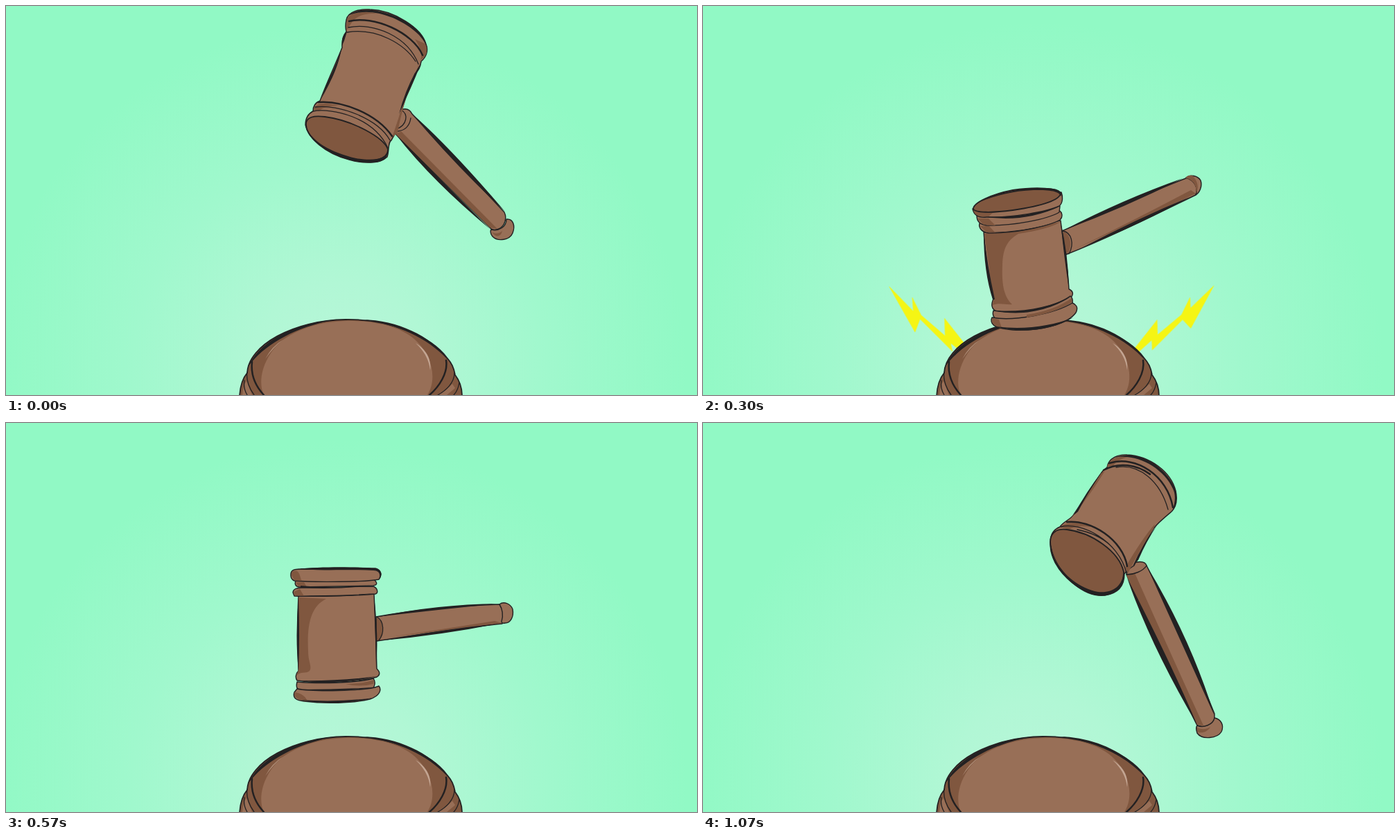
These frames come from a looping animation (997 by 562 pixels, 1.17 s). An HTML page without scripts:

```html
<!DOCTYPE html>
<html lang="en">
<head>
<meta charset="utf-8">
<title>Gavel</title>
<style>
html, body { margin: 0; width: 100%; height: 100%; overflow: hidden; background: #91f9c5; }
svg { display: block; width: 100%; height: 100%; }
:root { --ink: #232122; --wood: #986f57; --shade: #80573f; --bolt: #f5f514; }

.b { fill: var(--wood); stroke: var(--ink); stroke-width: 1.4; stroke-linejoin: round; }
.f { fill: var(--shade); stroke: var(--ink); stroke-width: 1.8; }
.s { fill: var(--shade); }
.w { fill: var(--wood); }
.k { fill: var(--ink); }
.l { fill: none; stroke: var(--ink); stroke-width: 1.3; stroke-linecap: round; }
.t { stroke-width: 2.5; }
.h { fill: #c3a592; }

/* each pose is held for its own window of the loop */
.pose { visibility: hidden; animation: hold 1170ms step-end calc(var(--t) * 1ms - 1170ms) infinite; }
.quick { animation-name: hold-quick; }
@keyframes hold { 0% { visibility: visible; } 8.547%, 100% { visibility: hidden; } }
@keyframes hold-quick { 0% { visibility: visible; } 7.6923%, 100% { visibility: hidden; } }

/* bolts fly outwards in eight steps after the blow */
.bolt {
  fill: var(--bolt); stroke: var(--bolt); stroke-width: .8; visibility: hidden;
  transform-box: fill-box; transform-origin: var(--o, 50% 50%);
  animation: fly 1170ms infinite;
}
@keyframes fly {
  0% { visibility: hidden; transform: var(--from); animation-timing-function: step-end; }
  25.641% { visibility: visible; transform: var(--from); animation-timing-function: steps(8, end); }
  46.1538% { visibility: hidden; transform: var(--to); animation-timing-function: step-end; }
  100% { visibility: hidden; transform: var(--to); }
}
#left { --from: translate(195px, 172px) rotate(0deg) scale(.79); --to: translate(-65px, -57px) rotate(0deg) scale(1.07); }
#right { --from: translate(-181px, 159px) rotate(-5.8deg) scale(.8); --to: translate(60px, -53px) rotate(1.9deg) scale(1.067); }
#top { --o: 90% 0; --from: translate(8px, 276px) rotate(-5deg) scale(.8); --to: translate(-3px, -92px) rotate(1.7deg) scale(1.067); }
</style>
</head>
<body>
<svg viewBox="0 0 997 562" preserveAspectRatio="none">
<defs>
  <radialGradient id="glow" gradientUnits="userSpaceOnUse" cx="482" cy="524" r="500">
    <stop offset="0" stop-color="#b8f6d9"/>
    <stop offset=".25" stop-color="#b1f7d5"/>
    <stop offset=".6" stop-color="#a0f8cd"/>
    <stop offset="1" stop-color="#91f9c5"/>
  </radialGradient>

  <g id="raised">
    <path class="b" d="M570 150C578 147 583 150 586 156L719 298C723 306 720 318 711 322C705 325 700 323 698 320L562 185Z"/>
    <path class="s" d="M562 185L698 320L709 322L570 181Z"/>
    <path class="k" d="M584 154Q640 203 720 297Q650 232 584 154ZM562 185Q612 250 698 322Q625 248 562 185Z"/>
    <path class="l" d="M570 150C581 156 579 172 563 178M584 162C582 175 574 180 565 181"/>
    <path class="b" d="M722 308C732 307 735 318 731 328C727 338 710 341 702 333C698 328 699 324 700 323C711 326 722 319 722 308Z"/>
    <path class="s" d="M701 326C705 330 712 329 716 325C714 334 706 335 701 326Z"/>
    <path class="b" d="M491 20C493 8 510 4 525 5C560 6 600 32 606 55C610 65 606 74 599 80C598 88 594 95 590 98C582 118 573 140 569 158C566 170 564 182 556 194C551 196 553 210 550 218C540 228 515 228 495 222C460 213 435 190 432 172C432 160 437 155 443 152C443 145 445 140 453 137C463 110 475 85 485 60C484 48 487 42 491 37C489 30 490 25 491 20Z"/>
    <path class="s" d="M596 82C592 108 574 135 567 160L557 190L565 183C571 150 580 122 591 98ZM492 20C495 8 520 7 535 11C515 10 505 16 500 22L491 36ZM444 150C446 140 460 139 480 144C465 144 455 147 452 152ZM606 55C609 66 606 73 598 78C601 70 598 60 590 48Z"/>
    <path class="f" d="M433 172C432 160 445 158 460 160C500 165 545 190 551 207C552 222 530 226 505 222C470 215 435 195 433 172Z"/>
    <path class="k" d="M432 170C432 195 485 231 535 226C548 224 551 217 551 207C549 222 530 224 505 220C470 212 437 195 432 170ZM494 14C510 1 535 4 565 16C592 29 606 45 608 62C602 42 582 28 558 17C533 7 512 6 494 14ZM485 58C479 90 468 110 455 134L463 112Q479 80 485 58ZM590 97Q576 122 567 156Q576 136 591 102L600 80ZM485 57C484 46 487 41 492 37L488 50Z"/>
    <path class="l" d="M443 152C470 147 530 160 551 205M446 146C480 141 537 163 554 194M494 31C530 23 580 44 595 84M492 38C535 31 575 55 591 80"/>
    <path class="l t" d="M450 139C485 136 535 156 557 188M495 22C530 13 587 38 601 71"/>
  </g>

  <g id="falling">
    <path class="b" d="M519 256C570 240 640 222 702 214C712 218 718 231 714 241C650 258 590 275 523 291Z"/>
    <path class="s" d="M519 257C531 260 535 275 530 288L522 290ZM540 286Q620 264 714 240L700 236Q610 262 540 286Z"/>
    <path class="k" d="M519 257Q610 222 702 214Q610 235 519 257ZM530 290Q600 279 690 246Q600 267 530 290Z"/>
    <path class="l" d="M519 256C530 261 536 272 533 280L524 291"/>
    <path class="b" d="M702 214C706 208 718 211 721 220C724 230 720 240 714 241C718 231 712 218 702 214Z"/>
    <path class="s" d="M704 213C714 218 718 230 714 240C709 236 712 222 704 213Z"/>
    <path class="b" d="M402 234C403 270 407 320 413 346C409 350 410 356 416 359C450 364 510 357 526 350C530 343 527 336 522 334C519 300 520 260 516 229Z"/>
    <path class="s" d="M402 237L413 346C418 350 425 350 424 345C415 320 411 280 413 250C418 243 430 243 445 242C480 242 505 240 516 234L516 229Z"/>
    <path class="k" d="M402 237Q400 290 413 346Q406 300 402 237ZM516 232Q525 280 523 334Q519 290 516 232Z"/>
    <path class="b" d="M412 361C410 368 413 371 420 372C460 374 510 366 525 361C527 356 526 353 524 352C500 360 450 363 412 361Z"/>
    <path class="b" d="M411 375C409 384 415 388 430 389C475 392 510 384 528 375C534 370 534 361 527 359C505 370 450 374 411 372Z"/>
    <path class="k" d="M416 386C455 393 500 389 530 374C505 384 460 389 416 386ZM414 357C450 366 500 362 526 350C500 357 450 361 414 357Z"/>
    <path class="s" d="M416 363C450 368 490 365 520 357C500 366 450 370 416 369Z"/>
    <path class="b" d="M399 227C396 231 398 236 404 237C450 240 500 235 519 227C522 222 521 217 517 217C490 228 440 230 399 227Z"/>
    <path class="b" d="M399 215C396 220 399 223 407 224C450 226 500 220 517 215C520 211 518 208 514 207C480 216 430 218 399 215Z"/>
    <path class="b" d="M390 208C389 203 394 201 402 200C430 190 480 187 505 190C520 192 523 195 522 202C520 208 510 208 490 209C450 214 400 217 393 213Z"/>
    <path class="s" d="M405 202C440 189 490 187 518 193C490 203 450 208 405 207ZM391 208C392 202 400 201 405 203L403 214ZM398 218L410 216L425 223L404 223ZM399 230L420 230L425 237L404 236Z"/>
    <path class="k" d="M395 202C430 188 490 186 515 192C480 189 430 194 395 202ZM392 212C440 219 480 207 517 207C480 211 440 220 392 212ZM402 235C450 240 490 236 518 228C490 233 450 237 402 235ZM410 224Q465 226 515 216Q465 231 410 224Z"/>
    <path class="l" d="M407 207C440 208 490 203 519 194"/>
  </g>

  <g id="struck">
    <path class="b" d="M513 368C570 325 630 280 684 239C694 243 700 250 701 265C640 315 590 355 533 396C525 402 520 399 518 390Z"/>
    <path class="s" d="M513 369C527 368 534 382 529 398C522 400 518 395 513 369ZM540 388L700 264L693 259Q610 328 540 388Z"/>
    <path class="k" d="M518 364Q610 286 684 239Q610 300 518 364ZM538 392Q620 339 690 274Q620 326 538 392Z"/>
    <path class="l" d="M514 368C528 367 538 382 533 396M516 375C526 375 532 385 529 395"/>
    <path class="b" d="M684 239C688 232 704 234 709 243C714 253 710 262 701 262C700 250 694 243 684 239Z"/>
    <path class="s" d="M684 238C687 233 692 234 694 236C699 242 703 254 701 260C698 248 692 242 684 238Z"/>
    <path class="b" d="M404 396C410 430 420 460 428 480C422 487 424 495 428 500L428 513C428 524 443 531 465 531C500 530 535 510 545 490C548 480 546 474 543 469C544 461 540 456 537 454C528 440 522 410 513 368Z"/>
    <path class="s" d="M405 398L428 480C423 488 425 498 432 499C440 495 450 497 457 496C450 488 447 475 446 460C440 430 442 412 455 402C480 397 500 385 513 370L510 360ZM428 502C470 508 520 495 541 472L545 476C530 500 470 515 428 511Z"/>
    <path class="k" d="M404 397Q409 440 427 480L429 480Q413 435 404 397ZM517 385Q522 425 538 457Q526 425 517 385ZM428 514C430 538 510 535 545 489C515 525 460 537 428 514ZM428 480C422 487 422 495 429 502C425 492 426 487 430 482Z"/>
    <path class="l t" d="M428 500C470 506 525 490 542 466"/>
    <path class="l" d="M428 512C470 519 530 500 545 475M429 506C470 510 525 497 543 472"/>
    <path class="b" d="M393 376C392 388 398 395 405 397C440 404 492 388 508 365C512 358 511 350 508 345Z"/>
    <path class="s" d="M394 378C393 388 398 394 406 396L420 386ZM420 388C460 388 495 372 509 352L509 362C490 380 450 394 420 392Z"/>
    <path class="l" d="M398 382C440 391 490 375 509 350M405 398C440 404 490 388 509 364"/>
    <path class="b" d="M385 362C387 375 393 379 401 379C440 383 500 365 509 342C510 333 508 328 505 325Z"/>
    <path class="f" d="M386 362C385 345 405 329 440 321C475 314 506 317 507 330C508 346 475 363 440 371C410 377 388 376 386 362Z"/>
    <path class="l t" d="M386 360C387 374 396 378 410 377C445 376 500 358 508 338C509 325 500 318 480 318C462 318 445 320 435 323"/>
  </g>

  <g id="rebound">
    <path class="b" d="M521 321C580 296 640 268 702 244C712 248 718 258 714 269C650 300 590 330 527 355Z"/>
    <path class="s" d="M521 322C532 322 537 340 530 353L524 350ZM540 347L714 267L707 262Q620 308 540 347Z"/>
    <path class="k" d="M523 320Q610 275 695 245Q610 288 523 320ZM550 345Q640 309 705 272Q630 303 550 345Z"/>
    <path class="l" d="M522 321C535 323 539 340 531 354"/>
    <path class="b" d="M700 244C706 239 717 241 721 248C724 257 719 266 714 269C718 258 712 248 700 244Z"/>
    <path class="s" d="M699 244C704 239 710 240 711 243C717 250 719 260 714 267C716 256 711 248 699 244Z"/>
    <path class="b" d="M408 323C411 360 415 395 422 419C418 428 420 434 426 437C470 443 515 430 534 417C538 412 537 408 531 405C529 370 523 340 519 306Z"/>
    <path class="s" d="M409 325L422 420L421 428C430 424 440 428 449 427C436 415 434 395 435 370C436 345 442 335 458 325C485 321 508 315 519 308Z"/>
    <path class="k" d="M408 324Q408 380 421 420L424 420Q413 370 408 324ZM519 308Q524 360 531 405Q530 355 519 308Z"/>
    <path class="b" d="M422 436C420 442 422 447 428 449C470 453 520 438 536 426C537 420 536 417 533 415C510 431 460 443 422 436Z"/>
    <path class="b" d="M419 449C418 458 428 462 450 464C490 466 530 455 541 439C545 431 541 427 536 425C510 441 450 452 420 446Z"/>
    <path class="s" d="M421 447C418 455 425 459 434 461L430 449ZM470 442Q510 436 535 418L535 424Q510 440 470 446Z"/>
    <path class="k" d="M426 459C460 469 505 466 537 446C505 459 465 464 426 459ZM424 436C465 446 510 433 535 415C505 431 465 439 424 436Z"/>
    <path class="b" d="M402 310C400 318 407 323 415 324C450 325 500 315 518 305C523 300 521 294 517 291Z"/>
    <path class="b" d="M398 299C398 308 404 312 412 313C450 314 500 304 517 294L518 285Z"/>
    <path class="b" d="M392 289C394 299 402 302 412 301C450 302 500 293 517 285C523 280 522 270 520 265Z"/>
    <path class="s" d="M393 290C394 299 403 301 414 301L422 294ZM399 303L415 303L425 313L408 312ZM403 314L416 314L425 324L412 323Z"/>
    <path class="f" d="M393 289C393 280 420 268 450 262C485 257 516 259 519 267C517 277 490 285 450 291C420 295 395 295 393 289Z"/>
    <path class="k" d="M405 278C430 264 470 258 500 259C517 260 521 264 520 271C515 262 500 262 480 262C450 263 425 270 405 278ZM405 300Q465 303 517 286Q465 310 405 300ZM410 323Q465 326 518 306Q470 323 410 323Z"/>
  </g>

  <g id="level">
    <path class="b" d="M534 280C590 270 650 264 712 262C717 269 719 279 716 290C660 296 600 305 535 315Z"/>
    <path class="s" d="M535 281C545 285 545 305 538 314L534 314ZM555 309L716 289L705 286Q630 298 555 309Z"/>
    <path class="k" d="M536 280Q620 262 710 261Q620 270 536 280ZM545 314Q630 306 710 290Q630 298 545 314Z"/>
    <path class="l" d="M535 280C546 286 546 304 538 314"/>
    <path class="b" d="M712 262C718 257 728 261 731 269C733 280 728 289 720 289C716 290 715 288 715 287C718 278 716 268 712 262Z"/>
    <path class="b" d="M422 250C420 290 421 330 422 358C418 362 417 368 420 372C450 377 510 374 535 367C540 364 540 360 535 355C534 320 533 290 531 247Z"/>
    <path class="s" d="M422 252V357L419 365C425 358 433 363 438 358C442 352 436 345 436 330C434 290 440 265 462 254Z"/>
    <path class="k" d="M422 252Q417 310 422 357Q424 310 422 252ZM531 250Q538 310 534 355Q533 300 531 250Z"/>
    <path class="b" d="M420 374C418 382 420 385 425 386C460 388 510 386 530 383C534 376 532 372 530 369C505 376 450 377 420 374Z"/>
    <path class="b" d="M416 389C413 398 420 401 430 402C460 406 500 405 525 399C540 394 542 385 538 380C520 388 440 388 420 384Z"/>
    <path class="s" d="M416 389C415 397 422 400 435 402C432 394 425 390 416 389ZM490 377Q515 377 531 371L530 377Q510 382 490 377Z"/>
    <path class="k" d="M424 400Q480 410 530 397Q480 404 424 400ZM422 372Q480 379 535 366Q480 373 422 372ZM425 385Q480 389 530 382Q480 385 425 385Z"/>
    <path class="b" d="M414 245C414 240 420 238 426 238L530 236C537 239 537 246 533 247C500 250 440 251 416 250Z"/>
    <path class="b" d="M418 228C416 233 418 237 424 237L530 235C535 234 537 232 531 226Z"/>
    <path class="b" d="M411 221C410 212 416 211 425 211C460 209 510 209 533 210C541 212 543 219 538 226C520 230 440 230 416 228C412 226 411 224 411 221Z"/>
    <path class="s" d="M412 220C411 213 416 213 420 214C425 218 424 224 427 228L416 227ZM418 230L430 230L434 237L422 236ZM415 244L424 240L430 250L417 249Z"/>
    <path class="k" d="M420 211C455 207 510 208 533 210C544 213 543 221 538 226C541 218 538 213 530 213C490 211 450 214 420 211ZM425 235Q480 240 530 234Q480 241 425 238ZM418 249Q480 253 533 246Q480 250 418 249Z"/>
  </g>

  <g id="lifting">
    <path class="b" d="M565 234C620 258 680 290 733 321C734 335 728 345 720 350C670 325 610 298 556 270Z"/>
    <path class="s" d="M556 269L570 268Q640 303 726 342L720 349Q630 308 556 269Z"/>
    <path class="k" d="M566 234Q660 267 731 319Q650 280 566 234ZM556 269Q640 319 719 349Q640 311 556 269Z"/>
    <path class="b" d="M563 235C577 242 576 260 558 267Z"/>
    <path class="b" d="M733 321C741 325 742 337 738 344C733 353 724 354 719 348C728 345 734 335 733 321Z"/>
    <path class="b" d="M466 158C456 195 448 235 444 262L437 270L553 298C557 260 565 215 574 183Z"/>
    <path class="w" d="M469 136L580 162L574 188Q520 172 466 163Z"/>
    <path class="s" d="M466 162L445 262L464 265C463 250 470 240 471 210C473 190 470 172 467 160ZM554 270L573 187L568 190Q560 235 554 290Z"/>
    <path class="k" d="M466 160Q448 215 444 262L447 262Q455 210 466 160ZM574 184Q559 230 554 290Q567 235 574 184Z"/>
    <path class="w" d="M440 264Q500 265 553 294L550 309Q500 287 438 282Z"/>
    <path class="b" d="M436 272C436 267 440 263 446 264C480 267 530 279 554 293C556 298 553 301 549 302C520 285 470 276 440 276Z"/>
    <path class="b" d="M438 278C438 283 436 285 441 286C480 286 525 298 549 309L551 300C520 284 470 275 438 275Z"/>
    <path class="b" d="M428 294C428 286 433 283 440 282C480 283 530 296 551 307C554 320 550 328 540 329C500 330 440 314 428 294Z"/>
    <path class="f" d="M431 294C460 288 530 306 549 323C545 330 520 329 500 326C470 320 440 308 431 294Z"/>
    <path class="k" d="M430 297C450 316 500 330 540 330C550 329 552 322 551 317C547 328 530 327 505 324C475 318 450 309 430 297ZM437 271Q500 273 553 297Q500 277 437 271ZM455 283Q510 285 551 307Q510 291 455 283Z"/>
    <path class="w" d="M468 136Q530 138 581 163L577 176Q530 150 467 150Z"/>
    <path class="b" d="M463 148C460 155 462 160 466 162C474 156 486 156 496 157C530 160 560 172 574 187C580 185 581 178 577 173C550 153 500 142 468 145Z"/>
    <path class="w" d="M472 155Q530 154 571 183L571 189Q520 168 471 164Z"/>
    <path class="b" d="M468 138C465 146 468 148 473 147C510 146 550 157 577 172C583 169 583 164 580 161C550 146 510 136 468 138Z"/>
    <path class="b" d="M465 133C463 122 475 122 490 121C530 117 570 131 586 150C590 158 586 163 581 165C550 147 500 133 470 138Z"/>
    <path class="s" d="M466 132C466 124 475 123 482 125C476 130 475 135 474 138L468 138ZM463 151L473 147L478 157L466 161ZM469 140L479 138L482 146L471 147Z"/>
    <path class="k" d="M470 124C510 115 560 124 588 154C560 130 510 120 470 124ZM472 136Q530 130 580 165Q530 139 472 136ZM470 148Q520 140 577 172Q525 149 470 148ZM470 160Q520 150 568 177Q525 157 470 160Z"/>
  </g>

  <g id="peak">
    <path class="b" d="M611 219L640 206C675 275 710 350 738 420L738 432C730 440 720 440 713 437C680 370 645 300 611 219Z"/>
    <path class="s" d="M611 220L623 217Q668 318 722 437L713 436Q655 320 611 220Z"/>
    <path class="k" d="M640 206Q704 312 738 423Q696 330 640 206ZM612 224Q646 322 713 436Q672 340 612 224Z"/>
    <path class="b" d="M614 207C625 198 638 199 640 206C635 214 622 219 611 219Z"/>
    <path class="b" d="M738 426C748 428 752 437 748 446C742 456 720 458 713 448C711 442 712 438 713 437C722 441 736 436 738 426Z"/>
    <path class="s" d="M713 440C720 444 728 442 732 439C728 447 718 449 713 446Z"/>
    <path class="b" d="M583 64C585 50 600 45 612 46C645 48 675 70 682 98C685 112 682 122 676 128C668 135 655 145 650 153C640 168 632 185 622 206C612 212 610 215 608 218C608 235 600 246 580 249C550 251 510 220 502 185C499 165 503 155 515 150C520 142 530 140 535 132C550 110 565 85 577 69Z"/>
    <path class="s" d="M574 73L537 131L525 142Q545 125 580 69ZM583 63C587 50 600 48 614 49C600 52 594 58 592 62ZM650 153Q632 180 613 217L609 209Q635 165 652 146ZM515 150C530 140 550 145 560 150C545 148 535 150 528 154Z"/>
    <path class="f" d="M502 180C498 160 508 152 525 154C560 158 600 185 607 215C608 240 590 249 570 247C535 240 506 210 502 180Z"/>
    <path class="k" d="M501 168C500 205 540 250 575 250C600 248 609 233 607 215C605 237 590 246 570 244C535 237 504 208 501 168ZM594 50C625 38 668 60 682 97C685 112 682 122 677 128C682 113 682 103 678 95C665 65 625 43 594 50ZM576 70Q553 99 535 133L541 128Q558 96 576 70ZM655 148Q635 173 620 207L628 198Q640 170 655 148Z"/>
    <path class="l" d="M516 150C545 142 600 170 611 217M596 64C630 58 660 85 671 125M540 154Q570 160 588 177"/>
    <path class="l t" d="M525 143C560 139 606 169 612 207M578 68C600 56 626 60 645 74M586 58C625 46 670 76 678 122"/>
  </g>
</defs>

<rect width="997" height="562" fill="url(#glow)"/>

<path class="bolt" id="left" d="M55 217L99 262L97 237L113 269L157 307L156 275L234 374L167 320L170 335L111 276L102 300Z"/>
<path class="bolt" id="right" d="M943 239L894 311L881 294L821 343L822 325L752 376L835 290L833 317L880 285L898 256L897 275Z"/>
<path class="bolt" id="top" d="M490 83L486 147L499 137L486 238L506 213L488 300L484 239L470 254L479 167L457 164Z"/>

<g id="block">
  <path class="f" d="M337 564C338 545 343 536 348 530C350 490 415 454 490 453C560 452 615 480 636 508C643 516 646 522 648 533C655 542 658 552 658 564Z"/>
  <path class="w" d="M372 562C362 540 372 505 400 482C430 462 460 455 500 455C550 456 580 470 595 487C615 508 622 540 608 562ZM622 562Q638 553 644 546L648 552L636 562ZM341 562Q342 548 347 542L355 562Z"/>
  <path class="k" d="M350 520C365 485 420 456 478 453C425 461 375 486 350 520ZM515 453C565 454 615 477 638 512C610 480 565 460 515 453Z"/>
  <path class="l t" d="M355 514C353 532 360 549 372 562M635 512C638 530 625 550 611 562"/>
  <path class="l" d="M348 529C346 541 352 554 358 562M344 541Q342 552 348 562M647 530C647 545 634 556 623 562M654 544Q652 556 646 562"/>
  <path class="h" d="M591 487C606 496 614 510 612 526C610 510 603 498 591 487Z"/>
  <path class="h" opacity=".7" d="M374 510Q384 491 400 482Q386 493 374 510Z"/>
</g>

<use href="#raised" class="pose" style="--t:0"/>
<use href="#lifting" class="pose" style="--t:100" transform="translate(-20 -25) rotate(-6 508 225)"/>
<use href="#falling" class="pose" style="--t:200"/>
<use href="#rebound" class="pose quick" style="--t:300" transform="translate(-3 4)"/>
<use href="#struck" class="pose quick" style="--t:390"/>
<use href="#rebound" class="pose quick" style="--t:480"/>
<use href="#level" class="pose" style="--t:570"/>
<use href="#lifting" class="pose" style="--t:670" transform="translate(-16 41) rotate(-8 508 225)"/>
<use href="#lifting" class="pose" style="--t:770"/>
<use href="#raised" class="pose" style="--t:870" transform="translate(14 70) rotate(-5 520 115)"/>
<use href="#peak" class="pose" style="--t:970" transform="translate(-26 20) rotate(-8 592 147)"/>
<use href="#peak" class="pose" style="--t:1070"/>
</svg>
</body>
</html>
```
